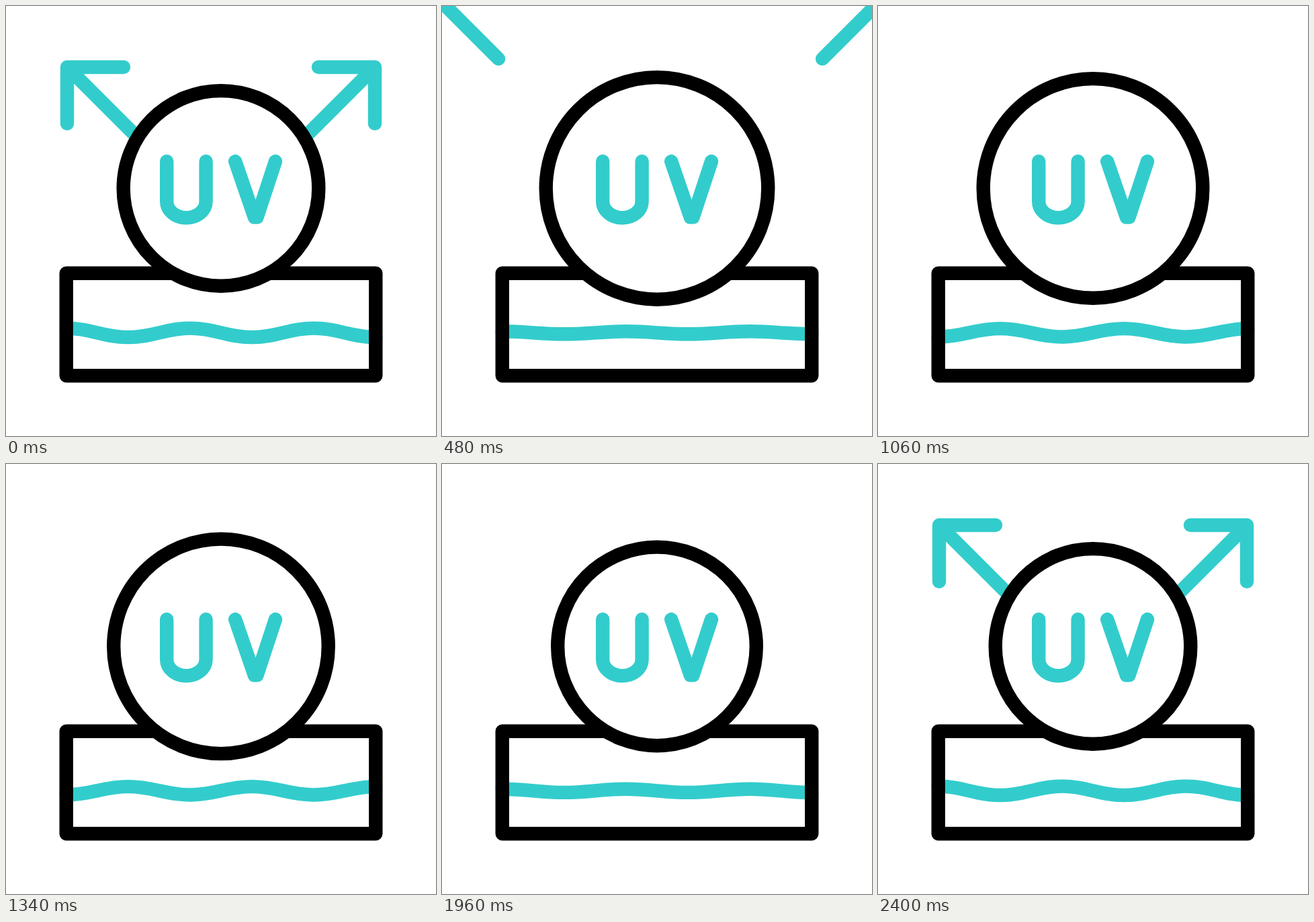
Animation, 640 px wide and 640 px high, one loop 2420 ms. Source, as an HTML page:

```html
<!DOCTYPE html>
<html lang="en">
<head>
<meta charset="utf-8">
<title>UV reflection</title>
<style>
  html, body { margin: 0; width: 100%; height: 100%; overflow: hidden; background: #fff; }
  svg { display: block; width: 100vw; height: 100vh; }
  svg * { fill: none; stroke-width: 20.4; stroke-linecap: round; stroke-linejoin: round; }
  .cyan { stroke: #33cccc; }
  .black { stroke: #000; }
  #disc { fill: #fff; }
</style>
</head>
<body>
<svg viewBox="0 0 640 640">
  <path id="wave" class="cyan"/>
  <path id="left" class="cyan" d="M175 91H91V175M91 91L196 196"/>
  <path id="right" class="cyan" d="M465 91H549V175M549 91L444 196"/>
  <rect class="black" x="89.7" y="397.7" width="460.6" height="152.6"/>
  <circle id="disc" class="black" cx="320" cy="271.4"/>
  <path class="cyan" d="M239.2 231.3V291A29.2 24.2 0 0 0 297.6 291V231.3"/>
  <path class="cyan" d="M341.2 231.3L369.8 314.4H373.6L401 231.3"/>
</svg>
<script>
const LOOP = 2420, CYCLE = 2400, STEP = 20;
const [wave, left, right, disc] =
  ['wave', 'left', 'right', 'disc'].map(id => document.getElementById(id));

// Disc growth: [time, extra radius, slope per ms]
const growth = [
  [0, 0, 0.04], [180, 10, 0.055], [480, 20, 0.004], [600, 20.3, 0],
  [1060, 18, -0.009], [1600, 10, -0.018], [1960, 2.5, -0.014], [2400, 0, 0]
];

const smooth = u => u * u * (3 - 2 * u);

// Cubic Hermite interpolation between keys
function hermite(keys, t) {
  const i = Math.max(1, keys.findIndex(k => k[0] >= t));
  const [t0, v0, m0] = keys[i - 1], [t1, v1, m1] = keys[i];
  const d = t1 - t0, u = (t - t0) / d, s = smooth(u);
  return v0 + (v1 - v0) * s + d * u * (1 - u) * (m0 * (1 - u) - m1 * u);
}

function wavePath(amp) {
  const half = 92.12, grip = half * 0.4, mid = 486.3;
  let d = `M89.7 ${mid - amp}`;
  for (let i = 0; i < 5; i++) {
    const dy = i % 2 ? -2 * amp : 2 * amp;
    d += `c${grip} 0 ${half - grip} ${dy} ${half} ${dy}`;
  }
  return d;
}

function draw() {
  const now = performance.now() % LOOP;
  const t = Math.min(CYCLE, Math.floor(now / STEP) * STEP);

  // Arrows fly off, then emerge again from behind the disc
  const flight = t < 1800 ? t : t - CYCLE;
  const rise = -0.2445 * flight;
  left.setAttribute('transform', `translate(${-0.2333 * flight} ${rise})`);
  right.setAttribute('transform', `translate(${0.2545 * flight} ${rise})`);

  disc.setAttribute('r', 145.3 + hermite(growth, t));

  const swing = 1 - Math.abs(1 - t / 1200);
  wave.setAttribute('d', wavePath(6.7 * (1 - 2 * smooth(swing))));
  requestAnimationFrame(draw);
}
draw();
</script>
</body>
</html>
```
